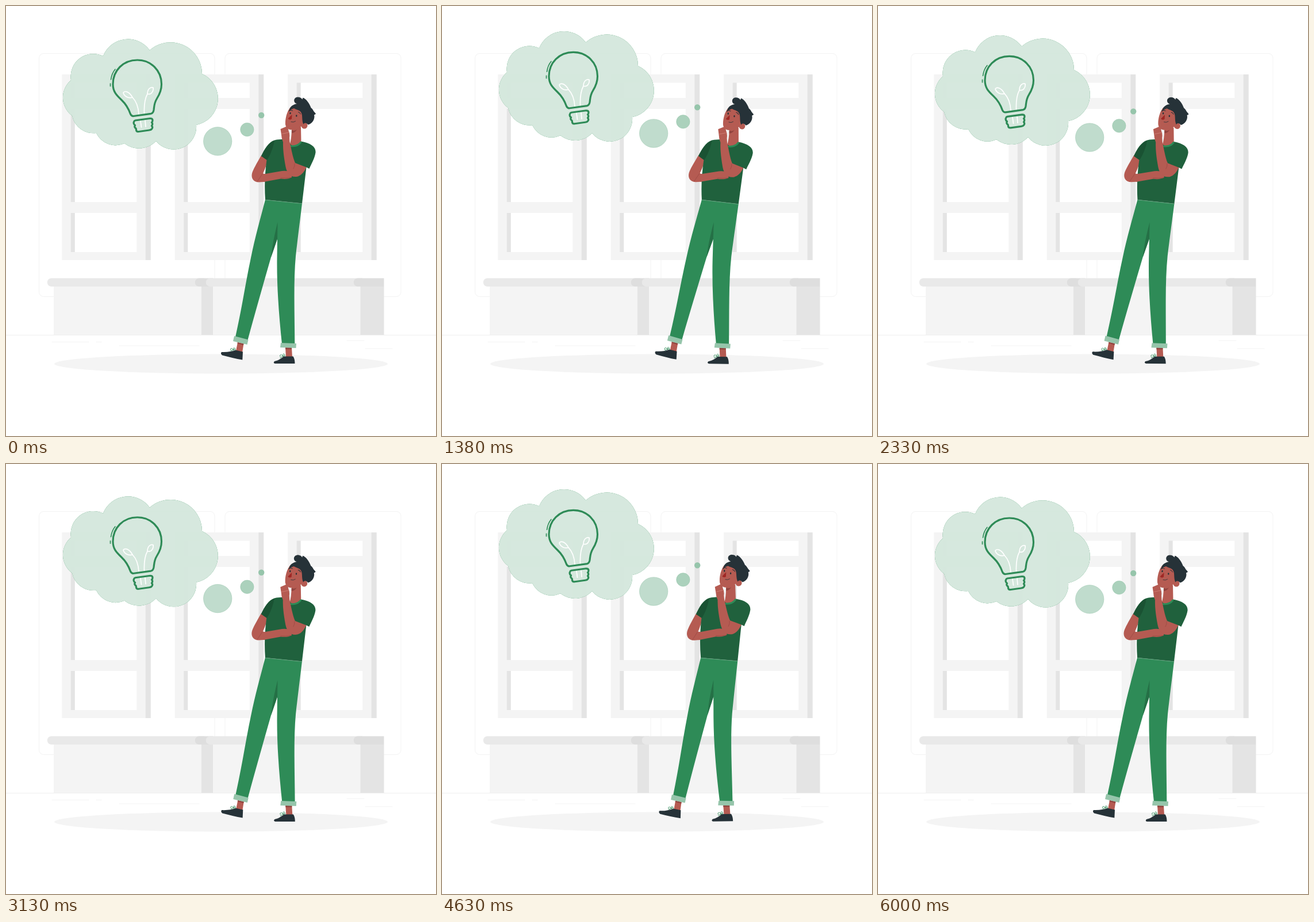
An HTML page that plays this animation: 748 by 748 pixels, repeating every 6040 ms.

```html
<!DOCTYPE html>
<html lang="en">
<head>
<meta charset="utf-8">
<title>Thinking</title>
<style>
html, body { margin: 0; height: 100%; overflow: hidden; background: #fff; }
svg { display: block; width: 100%; height: 100%; }
.line { fill: none; stroke-linecap: round; stroke-linejoin: round; }
.skin { fill: #b55b52; }
.dark { fill: #263238; }
.green { fill: #2e8b57; }
.mint { fill: #96c5ab; }
.shirt { fill: #20613d; }
</style>
</head>
<body>
<svg viewBox="0 0 748 748">
  <defs>
    <g id="window">
      <path fill="#f4f4f4" d="M0 119H146V442H0Z"/>
      <path fill="#e4e4e4" d="M145.5 119H154.5V442H145.5Z"/>
      <path fill="#e4e4e4" d="M15.5 133.5h8v26.5h-8zM15.5 179h8v162h-8zM15.5 360h8v68h-8z"/>
      <path fill="#fff" d="M22.5 133.5H130V160H22.5zM22.5 179H130V341H22.5zM22.5 360H130V428H22.5z"/>
    </g>
    <path id="puff" d="M113 129A39.5 39.5 0 0 1 169 87A46.5 46.5 0 0 1 250 77A54.7 54.7 0 0 1 341 118A47 47 0 0 1 331 207A39.5 39.5 0 0 1 261 235A41 41 0 0 1 206 239A37 37 0 0 1 157 221A38 38 0 0 1 115 191A39.5 39.5 0 0 1 113 129Z"/>
  </defs>

  <!-- room -->
  <g class="line" stroke="#f3f3f3">
    <rect x="57.5" y="82.5" width="305.5" height="423" rx="8"/>
    <rect x="381" y="82.5" width="306" height="423" rx="8"/>
    <path stroke="#efefef" d="M0 572.5H748"/>
    <path d="M80 584.5H144M157 584.5H166M197 591H336M593 582H623M625 596H672"/>
  </g>
  <use href="#window" x="97.3"/>
  <use href="#window" x="293.8"/>
  <use href="#window" x="490.2"/>
  <path fill="#f4f4f4" d="M83 488H340V572H83ZM360 488H617V572H360Z"/>
  <path fill="#e4e4e4" d="M340 488H360V572H340ZM616.5 488H657.5V572H616.5Z"/>
  <path fill="#e9e9e9" d="M79 473.5H345V488H79A7.2 7.2 0 0 1 79 473.5Z"/>
  <path fill="#dedede" d="M336 473.5H360V488H336A7.2 7.2 0 0 1 336 473.5Z"/>
  <path fill="#e9e9e9" d="M355 473.5H620V488H355A7.2 7.2 0 0 1 355 473.5Z"/>
  <path fill="#dedede" d="M612 473.5H657.5V488H612A7.2 7.2 0 0 1 612 473.5Z"/>
  <ellipse cx="374" cy="622.5" rx="290" ry="17" fill="#f4f4f4"/>

  <!-- thought bubble -->
  <g id="cloud">
    <g opacity=".97">
      <use href="#puff" class="green"/>
      <use href="#puff" fill="#d5e8dd"/>
    </g>
    <g stroke="#96c5ab" stroke-width=".5">
      <circle cx="368.2" cy="235.3" r="24.7" fill="#c0dccd"/>
      <circle cx="419.4" cy="215" r="11.7" fill="#abd1bc"/>
      <circle cx="444.2" cy="190" r="5.2" fill="#96c5ab" stroke="none"/>
    </g>
    <g class="line" stroke="#fff" stroke-width="1.7">
      <path d="M231 188C230 174 226 165 220 159C214 161 206 158 204 151C206 147 214 148 220 159"/>
      <path d="M240.500 187C240 172 241 162 246 153C253 155 257 148 256 142C251 140 246 145 246 153"/>
      <path d="M234 200L235.500 211M242 199L243 210"/>
    </g>
    <g class="line" stroke="#2e8b57" stroke-width="3.2">
      <path d="M186 136C186 112 204 94 228.500 94C252 94 270.500 112 270.500 136C270.500 147 267 154 262.500 161C257.500 169 258 174 257 181Q256 186.500 252 187.300L222 191.500Q218.500 192 216.500 188C213 178 209 171 201 163.500C192 155 186 149 186 136Z"/>
      <path d="M225 199L251 195.500Q255 195.500 255 199Q255 201.500 253.500 202.500Q256 205 253.500 208.500Q256 211 253.500 214Q252.500 215.500 249 216L231 218.500Q227 219 226.500 216Q226.500 214 226 213Q222.500 211 224.500 207.500Q221 205 222.500 201.500Q223 199.500 225 199Z"/>
      <path stroke-width="1.6" d="M182.500 128Q184 117 190 110M181.500 135V139.500"/>
    </g>
  </g>

  <!-- person -->
  <g id="man">
    <path class="skin" d="M403 585L413.500 587L411 603L400 600ZM486 594H497L498 611H487Z"/>
    <path fill="#91443f" d="M403 585L413.500 587.500L413 590L402.500 587ZM486 594H497V597H486Z"/>
    <path class="dark" d="M375 602C385 602.500 393 601 399 598.500L412 601.500L411.300 615.500C400 614 388 610.500 376 607.500Q372.500 604.500 375 602Z"/>
    <path class="dark" d="M467 618C475 616.500 479 612.500 483 609.500L499.500 609.500Q502.500 614 502.500 622H468Q464 621 467 618Z"/>
    <g class="line" stroke="#2e8b57" stroke-width=".9">
      <path d="M391 599C389 595 393 594 396 599C394 593 399 593 399 599M391 600L398 597"/>
      <path d="M477 610C475 606 480 605 482 610C480 603 486 604 485 609M477 612L484 608"/>
    </g>

    <path class="green" d="M451 337L515 343.500C512 369 508 399 504 435C500 480 502 530 502.300 588H480C475 540 471 490 471.500 440L472 405L461 437C447 486 434 531 420.500 581L399 576C411 522 417 480 426 438C433 403 443 368 451 337Z"/>
    <path fill="#257046" d="M472.500 376C467 398 463 418 461 437L472 405Z"/>
    <path class="mint" d="M397 574L421.500 580.500L419.500 589L395 583ZM478 586L505 587L504.500 595L477 594Z"/>

    <!-- neck, arm and torso -->
    <path class="skin" d="M497 211H513L513.500 237Q505 246 493 243Q497 232 497 211Z"/>
    <path fill="#91443f" d="M497 216Q502 218 506 215Q502 221 497 221Z"/>
    <path class="skin" d="M444 260C436 274 430 284 428 291C426 299 430 306.500 440 306.500L462 305L490 299V287L450 292Q446 292 447.500 290C451 283 453 276 456 267Z"/>
    <path class="shirt" d="M471 232.500L490 231Q493 244 502 243.500Q510 243 513.500 235.500C530 238.500 539.500 245 538.500 255C537 265 531 275 527.500 283L522.500 280.500L515 343.500L451 337C449.500 315 450 292 453.500 267.500L444 261C450 248 458 234 471 232.500Z"/>
    <path fill="#1a5233" d="M467 234C464 250 459 260 454 268L444 261C450 249 457 238 467 234Z"/>
    <path class="line" stroke="#2e8b57" stroke-width="3" d="M495 243.500Q508 245 513.500 236" style="stroke-linecap:butt"/>
    <path class="line" stroke="#6fab89" stroke-width=".7" d="M451 337.300L515 343.800"/>
    <path class="skin" d="M448 292.500L480 287Q489 286 497 289V298Q490 302 478 300.500L448 306Z"/>
    <path class="skin" d="M477.500 214L488 209.500Q491 212 491.500 217Q494 222 493 229L493.500 236C497 252 499 264 503 273L522.500 280.500C518 290 512 297 503 297C494 297 489 291 486.500 280C483.500 264 481.500 250 482 237Q479 230 479 224Z"/>
    <g class="line" stroke="#9b4943" stroke-width=".8">
      <path d="M437 305.500L446 292M478 299Q486 300 496 298.500M502 274Q503 278 500 283"/>
      <path stroke="#d3847a" d="M480 222.500L491.500 220"/>
    </g>

    <!-- head -->
    <path class="skin" d="M494 177C488 185 485.500 197 486 206C487 213 493 216.500 500 215C506 214 511 213 514 209L521 200L517 180L505 173Z"/>
    <circle class="skin" cx="519" cy="208" r="5.500"/>
    <path class="dark" d="M492.500 184C493 176 497 172 506 170C500 169 499 160 506.500 158.500C511 158 514 160 515.500 162.500L516.500 159.500C522 161 528 170 530.500 177C534 179 535 184 539 187.500L536 189.500C538 196 533 205 525.500 206.500C522 202 518 203 517.500 206C514 199 516.500 190 513.500 185.500C511 181 506 181 501 178C497 179 494 181 492.500 184Z"/>
    <path class="dark" d="M534 187Q538 190 538.500 187L536 184Z"/>
    <ellipse class="dark" cx="494.500" cy="186.500" rx="1.200" ry="1.800"/>
    <ellipse class="dark" cx="505.300" cy="191" rx="1.200" ry="1.800"/>
    <path fill="#a02724" d="M497.500 189Q494 192 490.500 196Q494 199 497 196.500Z"/>
    <g class="line" stroke="#263238">
      <path d="M492 182.500Q495 180 498.500 182M508.500 184.500Q511.500 185 512.500 188"/>
      <path stroke-width=".8" d="M496 201.500Q500 203 503.500 200.500"/>
    </g>
  </g>
</svg>
<script>
const cloud = document.getElementById('cloud');
const man = document.getElementById('man');
const LOOP = 6040, FPS = 24;

// linear wave: 0, 1, 0, -1 at the quarters of a turn
const triangle = p => 1 - Math.abs(4 * ((p + .25) % 1) - 2);

function draw(now) {
  const t = now % LOOP;
  const sec = Math.floor((t + 4) * FPS / 1000) / FPS;
  const lift = Math.abs(triangle(sec / 6));
  cloud.setAttribute('transform', `translate(0 ${-14.96 * lift})`);
  man.setAttribute('transform', `rotate(${triangle(sec / 6)} 456.5 390.5)`);
}

const start = performance.now();
function tick() {
  draw(performance.now() - start);
  requestAnimationFrame(tick);
}
tick();
</script>
</body>
</html>
```
